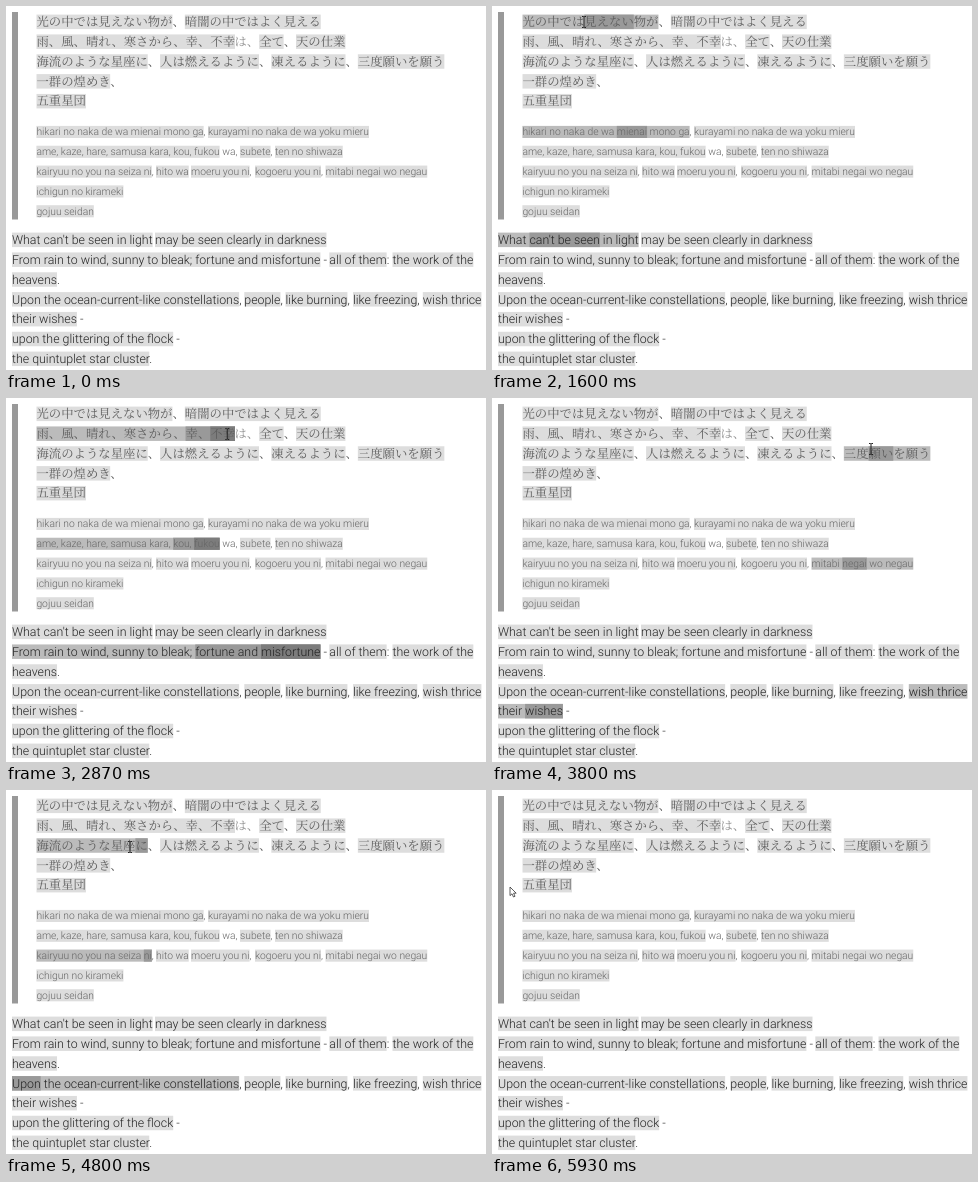
Animation of 480x364 px, one loop 6070 ms. Source, as an HTML page:

```html
<!DOCTYPE html>
<html lang="ja">
<head>
<meta charset="utf-8">
<style>
html, body { margin: 0; width: 100%; height: 100%; overflow: hidden; background: #fff; }
svg { display: block; width: 100vw; height: 100vh; }
text { white-space: pre; text-rendering: geometricPrecision; font-weight: 300; font-family: Roboto, sans-serif; }
.ja { font-family: "Noto Serif CJK JP", "Noto Sans CJK JP", "Noto Sans CJK", serif; font-size: 12.37px; fill: #5c5c5c; }
.ro { font-size: 10.31px; fill: #666; }
.en { font-size: 12.37px; fill: #222; }
</style>
</head>
<body>
<svg viewBox="0 0 480 364">
  <rect x="6" y="6" width="6" height="207.5" fill="#999"/>
  <g id="boxes"></g>
  <g id="words"></g>
  <path id="beam" d="M-2-5.5H-.6L0-5L.6-5.5H2M0-5V5M-2 5.5H-.6L0 5L.6 5.5H2" fill="none" stroke="#222"/>
  <path id="arrow" d="M0 0V8.6L2 6.8L3.5 10L5 9.3L3.6 6.2H6.2Z" fill="#fff" stroke="#333" stroke-width=".8"/>
</svg>
<script>
const LOOP = 6070, START = 200, STEP = 200 / 3, LAST = 86, PITCH = 19.83;
const SHADES = ['#ddd', '#bbb', '#999', '#7c7c7c'];
const $ = id => document.getElementById(id);

// First baseline, box ascent and box height for each language
const STYLES = {
  ja: { y: 20.1, up: 11.5, h: 14.5 },
  ro: { y: 129.4, up: 9.5, h: 12.1 },
  en: { y: 238.1, up: 11.5, h: 14.5 }
};
const JA = 30.5, RO = 30.4, EN = 6, EM = 12.37;

// [k...] marks a linked span with key k; outermost spans are phrases
const LINES = [
  ['ja', 0, JA, '[A[a[b光]の[c中]で]は[d見えない][e物]が]、[B[a[b暗闇]の中で]は[c[dよく]見える]]'],
  ['ja', 1, JA, '[C[a[b雨]、[c風]]、[d[e晴れ]、[f寒さから]]、[g[h幸]、[i不幸]]]'],
  ['ja', 1, JA + 16 * EM, 'は、', '#909090'],
  ['ja', 1, JA + 18 * EM, '[D全て]、[E[a天]の[b仕業]]'],
  ['ja', 2, JA, '[F[a[b海流]のような][c星座][dに]]、[G人は][H[a燃える][bように]]、[I[a凍える][bように]]、[J[a三度][b願い]を[c願う]]'],
  ['ja', 3, JA, '[K[a一群]の[b煌めき]]、'],
  ['ja', 4, JA, '[L[a五重][b星団]]'],

  ['ro', 0, RO, '[A[a[bhikari] no [cnaka] de] wa [dmienai] [emono] ga],'],
  ['ro', 0, 202, '[B[a[bkurayami] no naka de] wa [c[dyoku] mieru]]'],
  ['ro', 1, RO, '[C[a[bame], [ckaze]], [d[ehare], [fsamusa kara]], [g[hkou], [ifukou]]] wa,'],
  ['ro', 1, 234, '[Dsubete],'],
  ['ro', 1, 269, '[E[aten] no [bshiwaza]]'],
  ['ro', 2, RO, '[F[a[bkairyuu] no you na] [cseiza] [dni]],'],
  ['ro', 2, 150, '[Ghito wa]'],
  ['ro', 2, 185, '[H[amoeru] [byou ni]],'],
  ['ro', 2, 249, '[I[akogoeru] [byou ni]],'],
  ['ro', 2, 319.5, '[J[amitabi] [bnegai] wo [cnegau]]'],
  ['ro', 3, RO, '[K[aichigun] no [bkirameki]]'],
  ['ro', 4, RO, '[L[agojuu] [bseidan]]'],

  ['en', 0, EN, "[A[eWhat] [dcan't be seen] [ain [blight]]]"],
  ['en', 0, 149, '[B[cmay be seen [dclearly]] [ain [bdarkness]]]'],
  ['en', 1, EN, '[C[aFrom [brain] to [cwind]], [d[esunny] to [fbleak]]; [g[hfortune] and [imisfortune]]] -'],
  ['en', 1, 323.3, '[Dall of them]:'],
  ['en', 1, 386.5, '[Ethe [bwork] [aof the]]'],
  ['en', 2, EN, '[E[aheavens]].'],
  ['en', 3, EN, '[F[dUpon] the [a[bocean-current]-like] [cconstellations]],'],
  ['en', 3, 238.3, '[Gpeople],'],
  ['en', 3, 279.5, '[H[blike] [aburning]],'],
  ['en', 3, 347, '[I[blike] [afreezing]],'],
  ['en', 3, 416.8, '[J[cwish] [athrice]]'],
  ['en', 4, EN, '[Jtheir [bwishes]] -'],
  ['en', 5, EN, '[Kupon [bthe glittering] [aof the flock]] -'],
  ['en', 6, EN, '[Lthe [aquintuplet] [bstar cluster]].']
];

// Pointer path: time, x, y
const PATH = [
  [200, 364, 12], [800, 215, 16], [1600, 92, 16], [1850, 42, 20], [1950, 36, 31],
  [2070, 42, 35], [2870, 222, 36], [3130, 268, 36], [3320, 322, 39], [3400, 338, 48],
  [3550, 402, 52], [3640, 424, 51], [3800, 379, 51], [4130, 305, 53], [4670, 150, 56],
  [4800, 124, 57], [5270, 75, 60], [5400, 70, 74], [5600, 55, 77], [5700, 48, 93],
  [5800, 36, 97], [5860, 25, 97], [5930, 18, 97]
];
const ROW_ENDS = [316, 341, 440, 119, 81];

function add(parent, tag, attrs) {
  const el = document.createElementNS('http://www.w3.org/2000/svg', tag);
  for (const k in attrs) el.setAttribute(k, attrs[k]);
  return $(parent).appendChild(el);
}

function parse(markup) {
  const spans = [], stack = [];
  let text = '';
  for (let i = 0; i < markup.length; i++) {
    const c = markup[i];
    if (c === '[') {
      const up = stack[stack.length - 1];
      const span = { path: (up ? up.path : '') + markup[++i], depth: stack.length, from: text.length };
      spans.push(span);
      stack.push(span);
    } else if (c === ']') {
      stack.pop().to = text.length;
    } else {
      text += c;
    }
  }
  return { text, spans };
}

const boxes = [];
function addLine([lang, row, x, markup, fill]) {
  const { y, up, h } = STYLES[lang];
  const { text, spans } = parse(markup);
  const base = y + row * PITCH, top = base - up;
  const el = add('words', 'text', { class: lang, x, y: base });
  if (fill) el.style.fill = fill;
  el.textContent = text;
  for (const s of spans) {
    const left = el.getStartPositionOfChar(s.from).x;
    const right = el.getEndPositionOfChar(s.to - 1).x;
    const rect = add('boxes', 'rect', { x: left, y: top, width: right - left, height: h });
    boxes.push({ ...s, lang, left, right, top, bottom: top + h, rect });
  }
}
LINES.forEach(addLine);

function pointer(t) {
  let i = 1;
  while (i < PATH.length - 1 && PATH[i][0] < t) i++;
  const [t0, x0, y0] = PATH[i - 1], [t1, x1, y1] = PATH[i];
  const p = Math.max(0, Math.min(1, (t - t0) / (t1 - t0)));
  return [x0 + (x1 - x0) * p, y0 + (y1 - y0) * p];
}

function hovered([x, y]) {
  let path = '';
  for (const b of boxes) {
    if (b.lang === 'ja' && x >= b.left && x < b.right && y >= b.top && y < b.bottom) path = b.path;
  }
  return path;
}

function draw(t) {
  const k = Math.min(LAST, Math.floor((t - START) / STEP + 0.1));
  const now = START + k * STEP;
  // Highlighting trails the pointer by one step
  const path = k > 0 ? hovered(pointer(now - STEP)) : '';
  for (const b of boxes) {
    const lit = path.startsWith(b.path);
    b.rect.setAttribute('fill', lit ? SHADES[b.depth + 1] : b.depth ? 'none' : SHADES[0]);
  }
  const [x, y] = pointer(now);
  const row = Math.max(0, Math.min(4, Math.floor((y - 6) / PITCH)));
  const inText = x > 29 && x < ROW_ENDS[row];
  for (const [id, on] of [['beam', inText], ['arrow', !inText]]) {
    $(id).setAttribute('transform', `translate(${x} ${y})`);
    $(id).setAttribute('visibility', on && k >= 0 ? 'visible' : 'hidden');
  }
}

const begin = performance.now();
function tick() {
  draw((performance.now() - begin) % LOOP);
  requestAnimationFrame(tick);
}
tick();
</script>
</body>
</html>
```
